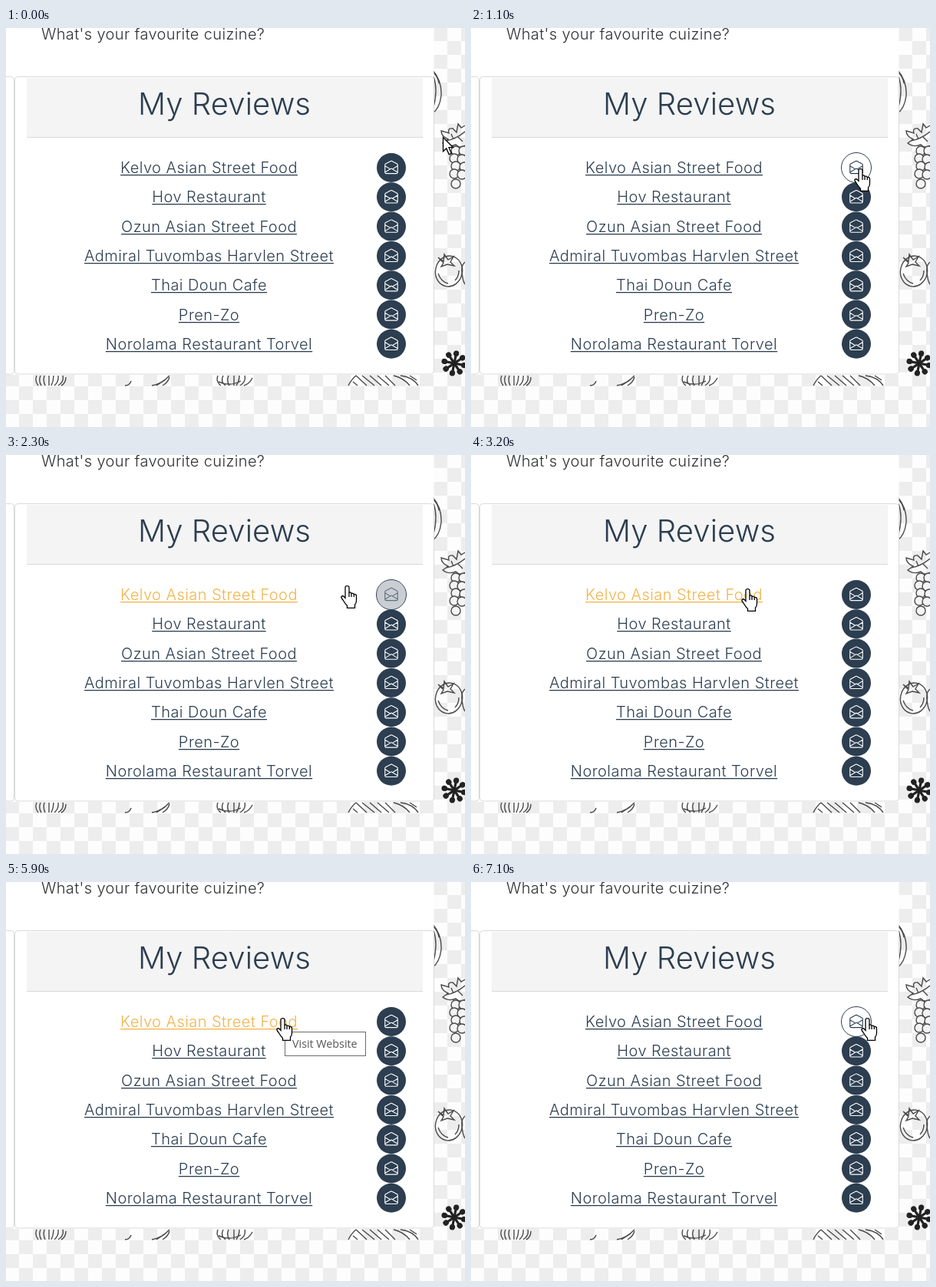
Animation, 598 px wide and 520 px high, one loop 7200 ms. Source, as an HTML page with a canvas:

```html
<!DOCTYPE html>
<html lang="en">
<head>
<meta charset="utf-8">
<title>My Reviews</title>
<style>
html, body { margin: 0; width: 100%; height: 100%; overflow: hidden; background: #fff; }
canvas { display: block; }
</style>
</head>
<body>
<canvas id="stage" width="598" height="520"></canvas>
<script>
const ctx = document.getElementById('stage').getContext('2d');
const LOOP = 7200, STEP = 100;
const NAVY = [44, 62, 80], WHITE = [255, 255, 255];
const SANS = 'Inter, "Open Sans", sans-serif';
const ROWS = [
  'Kelvo Asian Street Food',
  'Hov Restaurant',
  'Ozun Asian Street Food',
  'Admiral Tuvombas Harvlen Street',
  'Thai Doun Cafe',
  'Pren-Zo',
  'Norolama Restaurant Torvel'
];

// Pointer hotspot: time, x, y
const PATH = [
  [0, 570, 142], [200, 570, 142], [1000, 509, 184], [1800, 509, 184],
  [2200, 488, 176], [2300, 446, 171], [2600, 393, 171], [3200, 362, 175],
  [3400, 362, 178], [6100, 362, 178], [6900, 518, 178], [LOOP, 518, 178]
];

const ENVELOPE = new Path2D('M.5 5.4Q.5 4.4 1.3 4L7.3.85Q8 .5 8.7.85L14.7 4Q15.5 4.4 15.5 5.4V14' +
  'Q15.5 15.5 14 15.5H2Q.5 15.5 .5 14ZM.5 6.5L6.75 10.25M15.5 6.5L9.25 10.25M.5 14L8 9.5L15.5 14');
const HAND = new Path2D('M6 2.5Q6 .6 8.5 .6Q11 .6 11 2.5V9Q13.5 8.4 14 10.4Q16.5 9.5 17.3 11.5' +
  'Q20.5 11 20.5 14V20Q20.5 23 18.5 25V29.4H8.5V26.5Q6 24 3 19Q.3 16 1 14.5Q2.5 13 4.5 14.7L6 16.3Z');
const FINGERS = new Path2D('M11 9V15M14 10.5V15M17.3 11.5V15');
const ARROW = new Path2D('M.5.5V18.8L4.8 14.9L8.2 22.8L11.3 21.4L8 13.7H13.6Z');

const DOODLES = new Path2D(
  // aubergine
  'M556 55Q568 69 567 88Q565 105 555 112M557 63Q563 80 557 103M556 58Q562 62 564 72' +
  // vine leaf and stem
  'M598 153Q592 158 586 152Q576 156 569 150L576 145Q567 141 567 134L577 137Q575 130 582 131' +
  'L587 136L589 125L593 130L598 127M573 147Q586 145 598 135M583 145L580 138M589 142L595 148' +
  // tomatoes
  'M563 299L570 304L571 295L576 302L583 298L579 305L584 310L575 308L567 311L570 306Z' +
  'M563 320Q567 331 576 333M590 316Q590 324 585 329M598 305Q593 309 594 318Q595 330 598 334' +
  // cut-off vegetables along the bottom
  'M40 453Q37 460 42 466M45 453Q42 460 46 466M50 453Q48 460 51 466M56 453Q56 460 56 466' +
  'M62 453Q62 460 59 466M68 453Q69 461 63 466M74 453Q76 461 68 466M78 455Q78 463 72 466' +
  'M155 466Q161 466 163 460M190 466Q203 464 213 453M196 466L207 459M204 466Q211 462 213 455' +
  'M276 453Q273 461 280 466M283 453Q279 461 286 466M290 453Q287 460 291 466M297 453L297 466' +
  'M304 453Q304 460 300 466M311 453Q313 461 305 466M321 456Q317 464 310 466M277 461Q291 468 306 460' +
  'M446 466Q450 458 456 453M456 453L470 466M464 453L480 466M474 453L489 466M484 453L499 466' +
  'M494 453L507 466M452 461L458 466M505 453Q518 456 526 466M514 453Q530 455 537 466M526 453L535 459');
const GRAPES = [[586, 160], [596, 160], [584, 170], [594, 171], [586, 180], [597, 181], [584, 190], [594, 191], [586, 203]];

const clamp = v => Math.max(0, Math.min(1, v));
const ramp = (t, start, length) => clamp((t - start) / length);
const mix = (a, b, k) => `rgb(${a.map((v, i) => Math.round(v + (b[i] - v) * k))})`;

function box(x, y, w, h, color) {
  ctx.fillStyle = color;
  ctx.fillRect(x, y, w, h);
}

function circle(x, y, r) {
  ctx.beginPath();
  ctx.arc(x, y, r, 0, Math.PI * 2);
}

function label(text, x, y, size, color, spacing = 0, align = 'left') {
  ctx.font = `300 ${size}px ${SANS}`;
  ctx.letterSpacing = spacing + 'px';
  ctx.textAlign = 'left';
  const width = ctx.measureText(text).width;
  const left = align === 'center' ? x - width / 2 : x;
  ctx.fillStyle = color;
  ctx.fillText(text, left, y);
  ctx.letterSpacing = '0px';
  return { left, width };
}

function drawBackdrop() {
  box(0, 0, 598, 520, '#fdfdfd');
  const tile = 18;
  for (let j = 0; j < 30; j++)
    for (let i = 0; i < 34; i++)
      if ((i + j) % 2) box(i * tile - 1, j * tile - 1, tile, tile, '#ededed');

  ctx.strokeStyle = '#4a4a4a';
  ctx.lineWidth = 1.4;
  ctx.stroke(DOODLES);
  for (const [x, y] of GRAPES) {
    circle(x, y, 6);
    ctx.fillStyle = '#f4f4f4';
    ctx.fill();
    ctx.stroke();
  }
  ctx.beginPath();
  ctx.ellipse(577, 317, 17.5, 20, 0.2, 0, Math.PI * 2);
  ctx.stroke();
  drawSpice(584, 437);
}

function drawSpice(x, y) {
  ctx.save();
  ctx.translate(x, y);
  ctx.rotate(0.2);
  ctx.fillStyle = '#222';
  for (let i = 0; i < 8; i++) {
    ctx.rotate(Math.PI / 4);
    ctx.beginPath();
    ctx.ellipse(13, 0, 3.8, 3.6, 0, 0, Math.PI * 2);
    ctx.fill();
    ctx.fillRect(0, -1.6, 11, 3.2);
  }
  ctx.restore();
}

function drawCard() {
  box(0, 0, 557.5, 452, '#fff');
  ctx.strokeStyle = '#dadada';
  ctx.lineWidth = 1;
  for (const [x, w] of [[-300, 310.5], [11.5, 546]]) {
    ctx.beginPath();
    ctx.roundRect(x, 63.5, w, 387.5, 4);
    ctx.stroke();
  }
  box(27, 65, 516, 77, '#f4f4f4');
  box(27, 142, 516, 1, '#d9d9d9');
  label("What's your favourite cuizine?", 46, 15, 20, '#2e3033', 0.37);
  label('My Reviews', 284.5, 112.5, 40, mix(NAVY, WHITE, 0), 0.1, 'center');
}

function drawButton(y, hover) {
  const x = 502;
  circle(x, y, 19);
  ctx.fillStyle = mix(NAVY, WHITE, hover);
  ctx.fill();
  if (hover > 0) {
    circle(x, y, 19.5);
    ctx.strokeStyle = mix(NAVY, WHITE, 0);
    ctx.lineWidth = 1;
    ctx.stroke();
  }
  ctx.save();
  ctx.translate(x - 8.8, y - 9.4);
  ctx.scale(1.1, 1.1);
  ctx.strokeStyle = mix(WHITE, NAVY, hover);
  ctx.lineWidth = 1;
  ctx.stroke(ENVELOPE);
  ctx.restore();
}

function drawRows(linkHover, buttonHover) {
  ROWS.forEach((name, i) => {
    const y = 182 + i * 38.3;
    const color = i === 0 && linkHover ? '#f2b44a' : mix(NAVY, WHITE, 0);
    const { left, width } = label(name, 264.5, Math.round(y + 7), 20, color, 0.45, 'center');
    box(left, Math.round(y + 9), width, 1.3, color);
    drawButton(y, i === 0 ? buttonHover : 0);
  });
}

function drawTip(text, x, y, alpha) {
  if (alpha <= 0) return;
  ctx.save();
  ctx.globalAlpha = alpha;
  ctx.font = '400 14.3px "Open Sans", "Noto Sans", sans-serif';
  ctx.textAlign = 'left';
  const w = Math.round(ctx.measureText(text).width) + 21;
  box(x, y, w, 32, '#fff');
  ctx.strokeStyle = '#6b6b6b';
  ctx.lineWidth = 1;
  ctx.strokeRect(x + 0.5, y + 0.5, w - 1, 31);
  ctx.fillStyle = '#575757';
  ctx.fillText(text, x + 10, y + 21);
  ctx.restore();
}

function pointerAt(t) {
  const i = PATH.findIndex((p, n) => n > 0 && t <= p[0]);
  const [t0, x0, y0] = PATH[i - 1], [t1, x1, y1] = PATH[i];
  let k = (t - t0) / (t1 - t0);
  if (t1 - t0 >= 700) k = k * k * (3 - 2 * k);
  return [x0 + (x1 - x0) * k, y0 + (y1 - y0) * k];
}

function drawPointer(x, y, isHand) {
  ctx.save();
  ctx.translate(isHand ? x - 10 : x - 1, isHand ? y - 1 : y);
  ctx.fillStyle = '#fff';
  ctx.strokeStyle = '#000';
  ctx.lineWidth = 1.3;
  const shape = isHand ? HAND : ARROW;
  ctx.fill(shape);
  ctx.stroke(shape);
  if (isHand) ctx.stroke(FINGERS);
  ctx.restore();
}

function draw(t) {
  const [x, y] = pointerAt(t);
  const onLink = x < 465 && t > 2000;
  const onButton = Math.hypot(x - 502, y - 182) < 20;
  const buttonHover = ramp(t, 780, 150) - ramp(t, 2262, 150) + ramp(t, 6650, 150);

  drawBackdrop();
  drawCard();
  drawRows(onLink, buttonHover);
  if (t < 1900) drawTip('View Review', 509, 201, ramp(t, 1300, 300));
  else if (t < 6200) drawTip('Visit Website', 363, 195, ramp(t, 3700, 300));
  drawPointer(Math.round(x), Math.round(y), onLink || onButton);
}

const start = performance.now();
function frame() {
  const t = (performance.now() - start) % LOOP;
  draw(Math.floor(t / STEP) * STEP);
  requestAnimationFrame(frame);
}
frame();
</script>
</body>
</html>
```
